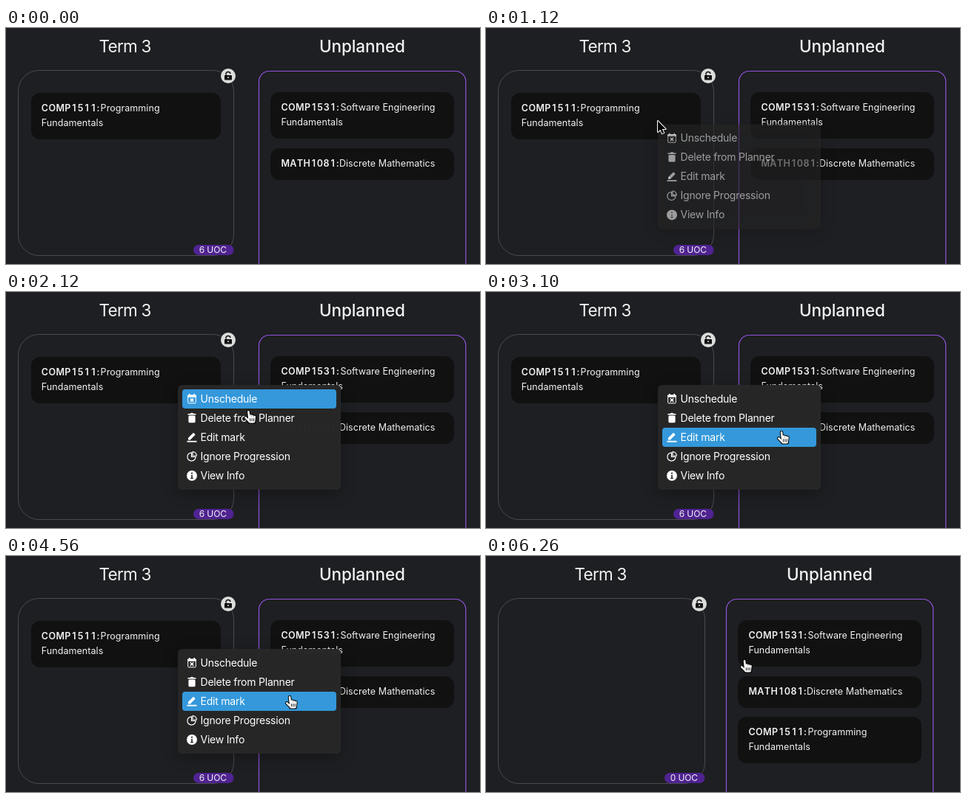
These frames come from a looping animation (640x320 px, 6490 ms). An HTML page with a canvas:

```html
<!DOCTYPE html>
<html lang="en">
<head>
<meta charset="utf-8">
<title>Term planner</title>
<style>
  html, body { margin: 0; width: 100%; height: 100%; overflow: hidden; background: #1e1f22; }
  canvas { display: block; width: 640px; height: 320px; }
</style>
</head>
<body>
<canvas id="stage" width="640" height="320"></canvas>
<script>
const ctx = document.getElementById('stage').getContext('2d');

const LOOP = 6490;
const CURSOR_IN = 200;
const MENU_OPEN = 1020;
const MENU_FADE = 300;
const MOVED = 5460;
const MENU = { x: 232, y: 126, w: 220, pad: 6 };
const ROW = 26;
const ITEMS = [
  ['Unschedule', calendarIcon],
  ['Delete from Planner', trashIcon],
  ['Edit mark', penIcon],
  ['Ignore Progression', pieIcon],
  ['View Info', infoIcon]
];

const ENTRY = { x: 532, y: 322 };
const MOVES = [
  { from: 200, to: 620, x: 232, y: 126 },
  { from: 1140, to: 1440, x: 272, y: 129 },
  { from: 1440, to: 1660, x: 290, y: 143 },
  { from: 1900, to: 2240, x: 342, y: 168 },
  { from: 2480, to: 2940, x: 399, y: 189 },
  { from: 3100, to: 3740, x: 396, y: 222 },
  { from: 3760, to: 4100, x: 390, y: 244 },
  { from: 4380, to: 4560, x: 383, y: 190 },
  { from: 4560, to: 4920, x: 349, y: 141 }
];

// Each move eases from wherever the previous one ended
function hotspot(t) {
  let { x, y } = ENTRY;
  for (const m of MOVES) {
    const u = Math.min(1, Math.max(0, (t - m.from) / (m.to - m.from)));
    const eased = u * u * (3 - 2 * u);
    x += (m.x - x) * eased;
    y += (m.y - y) * eased;
  }
  return { x, y };
}

function rowAt({ x, y }) {
  const row = Math.floor((y - MENU.y - MENU.pad) / ROW);
  const inside = x >= MENU.x + MENU.pad && x < MENU.x + MENU.w - MENU.pad;
  return inside && row >= 0 && row < ITEMS.length ? row : -1;
}

function box(x, y, w, h, r, fill) {
  ctx.beginPath();
  ctx.roundRect(x, y, w, h, r);
  ctx.fillStyle = fill;
  ctx.fill();
}

function frameBox(x, y, w, h, r, color, width = 1) {
  ctx.beginPath();
  ctx.roundRect(x, y, w, h, r);
  ctx.strokeStyle = color;
  ctx.lineWidth = width;
  ctx.stroke();
}

function disc(x, y, r, fill) {
  ctx.beginPath();
  ctx.arc(x, y, r, 0, Math.PI * 2);
  ctx.fillStyle = fill;
  ctx.fill();
}

function line(color, width, x1, y1, x2, y2) {
  ctx.beginPath();
  ctx.moveTo(x1, y1);
  ctx.lineTo(x2, y2);
  ctx.strokeStyle = color;
  ctx.lineWidth = width;
  ctx.stroke();
}

function setFont(size, weight = 400, spacing = 0, color = '#f2f2f3') {
  ctx.font = `${weight} ${size}px Inter, "Open Sans", sans-serif`;
  ctx.letterSpacing = spacing + 'px';
  ctx.fillStyle = color;
}

// Draws letters normally and centres each digit in an equal cell
function tabular(str, x, y) {
  const cell = ctx.measureText('0').width;
  for (const ch of str) {
    const own = ctx.measureText(ch).width;
    const step = ch >= '0' && ch <= '9' ? cell : own;
    ctx.fillText(ch, x + (step - own) / 2, y);
    x += step;
  }
}

function course(x, y, w, inset, code, gap, first, second) {
  box(x, y, w, second ? 63 : 43, 12, '#111112');
  const left = x + inset, base = y + 24.5;
  setFont(12.5, 600, 0.4);
  tabular(code + ':', left, base);
  setFont(12.5, 400, 0.06);
  ctx.fillText(first, left + gap, base);
  if (second) ctx.fillText(second, left, base + 20);
}

function lock(x, y) {
  disc(x, y, 10, '#dcdcdc');
  box(x - 5, y - 1, 10, 6.5, 1, '#111');
  ctx.beginPath();
  ctx.moveTo(x - 3, y);
  ctx.arc(x, y - 2.5, 3, Math.PI, -0.15);
  ctx.strokeStyle = '#111';
  ctx.lineWidth = 1.4;
  ctx.stroke();
  disc(x, y + 2, 1, '#dcdcdc');
}

function termPanel(moved) {
  const right = moved ? 296 : 308;
  setFont(22.5, 400, -0.75);
  ctx.fillText('Term 3', moved ? 119.5 : 125.5, 33);
  frameBox(16.5, 57.5, right - 17, 251, 28, '#4b4b4d');
  if (!moved) course(34, 88, 256, 13.8, 'COMP1511', 79.8, 'Programming', 'Fundamentals');
  lock(right - 8, 65);
  box(right - 55, 294, 54.5, 14, 7, '#4f2391');
  setFont(12, 400, -0.1);
  ctx.fillText(moved ? '0 UOC' : '6 UOC', right - 47.3, 305);
}

function unplannedPanel(moved) {
  ctx.save();
  if (moved) ctx.translate(-17, 0);
  setFont(22.5, 500, -0.1);
  ctx.fillText('Unplanned', 423, 33);
  frameBox(341.5, 58.5, 279.3, 290, 14, '#9254de', 1.2);
  course(357, 87, 248, 14.4, 'COMP1531', 80, 'Software Engineering', 'Fundamentals');
  course(357, 163, 248, 14.4, 'MATH1081', 78.5, 'Discrete Mathematics');
  if (moved) course(357, 218, 248, 14.4, 'COMP1511', 80, 'Programming', 'Fundamentals');
  ctx.restore();
}

// Icons are drawn around their own centre
function calendarIcon() {
  frameBox(-5.3, -4.8, 10.6, 10.6, 1, '#fff');
  box(-6, -5.5, 12, 3.2, 1, '#fff');
  for (const side of [-1, 1]) {
    box(side * 3.2 - 0.8, -7, 1.6, 2, 0, '#fff');
    line('#fff', 1.5, -2.2 * side, -0.8, 2.2 * side, 3.6);
  }
}

function trashIcon() {
  box(-4.6, -3.4, 9.2, 9.6, 1.5, '#fff');
  box(-5.5, -6, 11, 1.6, 0, '#fff');
  box(-2, -7, 4, 1.5, 0, '#fff');
}

function penIcon() {
  line('#fff', 3.8, -3.8, 2.4, 3.4, -4.8);
  box(-5, 1, 2.6, 2.6, 0, '#fff');
  box(-6.5, 4.8, 13, 1.8, 0, '#fff');
}

function pieIcon() {
  const wedge = (x, y, r, end) => {
    ctx.beginPath();
    ctx.moveTo(x, y);
    ctx.arc(x, y, r, -Math.PI / 2, end, end > 0);
    ctx.closePath();
    ctx.strokeStyle = '#fff';
    ctx.lineWidth = 1.2;
    ctx.stroke();
  };
  wedge(-0.5, 0.5, 5.6, Math.PI * 2);
  wedge(1, -1, 5.4, 0);
}

function infoIcon() {
  disc(0, 0, 7, '#fff');
  disc(0, -3.2, 1.1, '#262626');
  line('#262626', 1.6, 0, -1, 0, 3.6);
  line('#262626', 1.3, -1.8, 3.6, 1.8, 3.6);
}

function menu(t) {
  const left = 1 - Math.min(1, (t - MENU_OPEN) / MENU_FADE);
  const shown = 1 - left * left;
  ctx.save();
  ctx.globalAlpha = shown;
  ctx.translate(0, 10 * (1 - shown));

  ctx.save();
  ctx.shadowColor = 'rgba(0,0,0,.3)';
  ctx.shadowBlur = 20;
  ctx.shadowOffsetY = 5;
  box(MENU.x, MENU.y, MENU.w, ROW * ITEMS.length + 2 * MENU.pad, 6, 'rgba(39,39,39,.98)');
  ctx.restore();

  // The highlight trails the pointer slightly
  const hover = rowAt(hotspot(t - 40));
  ITEMS.forEach(([label, icon], i) => {
    const top = MENU.y + MENU.pad + i * ROW;
    if (i === hover) box(MENU.x + MENU.pad, top, MENU.w - 2 * MENU.pad, ROW, 4, '#3498db');
    ctx.save();
    ctx.translate(251, top + ROW / 2);
    icon();
    ctx.restore();
    setFont(14, 400, -0.22, '#fff');
    ctx.fillText(label, 262.5, top + 18);
  });
  ctx.restore();
}

function arrow() {
  ctx.beginPath();
  ctx.moveTo(0, 0);
  ctx.lineTo(0, 15);
  ctx.lineTo(3.4, 11.8);
  ctx.lineTo(5.8, 17.2);
  ctx.lineTo(8.2, 16.2);
  ctx.lineTo(5.9, 10.9);
  ctx.lineTo(10.6, 10.9);
  ctx.closePath();
  ctx.strokeStyle = '#fff';
  ctx.lineWidth = 2;
  ctx.stroke();
  ctx.fillStyle = '#000';
  ctx.fill();
}

// A hand is drawn as a black outline pass, then a white pass on top
function outlined(draw) {
  draw('#000', 1);
  draw('#fff', 0);
}

function pointHand() {
  outlined((color, edge) => {
    const width = 2.6 + 2 * edge;
    line(color, width, 0, 1.4, 1.2, 11);
    line(color, width, -3.8, 9.4, 1, 14);
    for (let i = 0; i < 3; i++) line(color, width, 3.2 + 2.6 * i, 6.6 + i * 0.7, 3 + 2.4 * i, 12);
    box(-edge, 9 - edge, 9 + 2 * edge, 7.6 + 2 * edge, 2.5, color);
  });
  for (let x = 2.4; x < 8; x += 2.4) line('#000', 0.9, x, 10.6, x, 14);
}

function grabHand() {
  ctx.translate(1, 0);
  outlined((color, edge) => {
    const width = 2.2 + 1.8 * edge;
    for (let i = 0; i < 4; i++) {
      const angle = (i - 1.5) * 0.26, x = 2.1 * i - 2.4;
      const reach = 9 - (i - 1.4) ** 2;
      line(color, width, x, 2, x + reach * Math.sin(angle), 2 - reach * Math.cos(angle));
    }
    line(color, width, -6, 1.8, -2, 5);
    box(-3.4 - edge, 1 - edge, 8 + 2 * edge, 6.6 + 2 * edge, 2.5, color);
  });
  for (let x = -1.2; x < 4; x += 2.1) line('#000', 0.8, x, 2, x, 5);
}

function cursor(t) {
  const p = hotspot(t);
  const onCard = t < MENU_OPEN && p.x < 290 && p.y < 151;
  const onRow = t >= MOVED || (t >= MENU_OPEN && rowAt(p) >= 0);
  ctx.save();
  ctx.translate(p.x, p.y);
  ctx.lineJoin = ctx.lineCap = 'round';
  if (onCard) grabHand();
  else if (onRow) pointHand();
  else arrow();
  ctx.restore();
}

const start = performance.now();

function frame() {
  const t = (performance.now() - start) % LOOP;
  const moved = t >= MOVED;
  ctx.fillStyle = '#1e1f22';
  ctx.fillRect(0, 0, 640, 320);
  termPanel(moved);
  unplannedPanel(moved);
  if (t >= MENU_OPEN && !moved) menu(t);
  if (t >= CURSOR_IN) cursor(t);
  requestAnimationFrame(frame);
}
frame();
</script>
</body>
</html>
```
